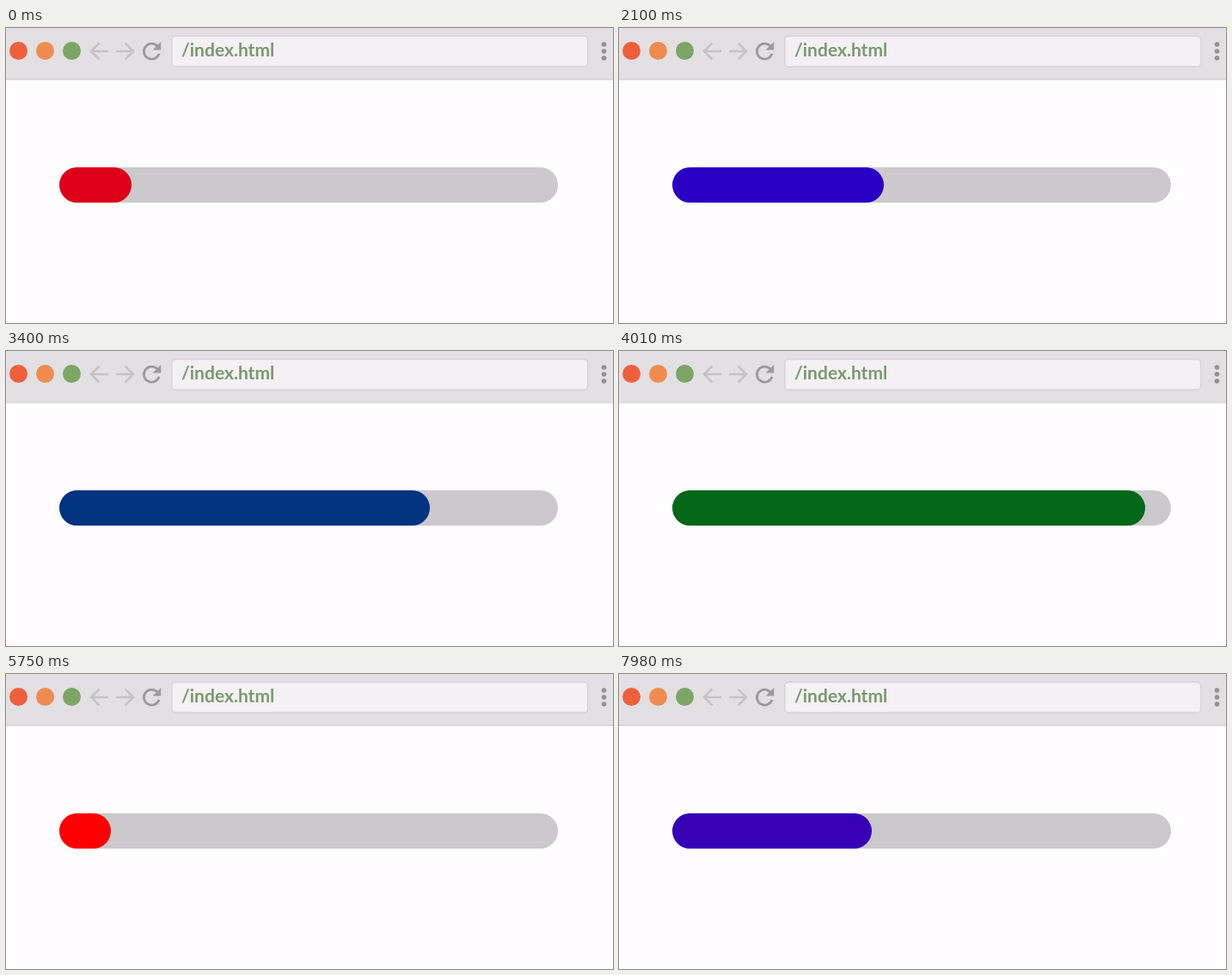
Recreate the animation shown at these times as an HTML page. Size 706 px wide and 343 px high, loop 8 s.

```html
<!DOCTYPE html>
<html lang="en">
<head>
<meta charset="utf-8">
<title>Progress bar</title>
<style>
  html, body { margin: 0; width: 100%; height: 100%; overflow: hidden; background: #fffdff; }
  svg { position: absolute; left: 0; top: 0; }
  .track, .fill { position: absolute; height: 41px; border-radius: 20.5px; }
  .track { left: 61.5px; top: 162px; width: 580px; background: #cbc9cb; }
  .fill { left: 0; top: 0; animation: load 8s linear infinite; }
  text { font: 700 21px Lato, "Open Sans", sans-serif; fill: #7b9871; }

  /* grow slowly to blue, quickly to green, then fall back to red */
  @keyframes load {
    0%       { width: 84.5px;  background: rgb(222, 0, 24); }
    14.25%   { width: 174.5px; background: rgb(115, 0, 116); }
    33.45%   { width: 290px;   background: rgb(0, 0, 246); }
    35.625%  { width: 324px;   background: rgb(0, 4, 221); }
    50.125%  { width: 550px;   background: rgb(3, 104, 23); }
    52.04%   { width: 580px;   background: rgb(3, 118, 0); }
    71.55%   { width: 58px;    background: rgb(255, 0, 0); }
    83%      { width: 129.5px; background: rgb(165, 0, 69); }
    100%     { width: 234px;   background: rgb(54, 0, 183); }
  }
</style>
</head>
<body>
<svg width="706" height="343" viewBox="0 0 706 343">
  <rect width="706" height="60" fill="#e2e0e2"/>
  <rect y="59" width="706" height="1.5" fill="#d4d2d4"/>
  <circle cx="14.5" cy="26.5" r="10.5" fill="#ee603c"/>
  <circle cx="45.5" cy="26.5" r="10.5" fill="#f08c50"/>
  <circle cx="76.5" cy="26.5" r="10.5" fill="#7ca566"/>
  <g fill="none" stroke="#c5c3c5" stroke-width="2.6">
    <path d="M119 27H99.5M108.5 17.5L99 27L108.5 36.5"/>
    <path d="M128 27H147.5M138.5 17.5L148 27L138.5 36.5"/>
  </g>
  <path d="M176.2 21.2A9 9 0 1 0 178 29.8" fill="none" stroke="#9c9a9c" stroke-width="2.8"/>
  <path d="M180.2 16V25.6H170.6Z" fill="#9c9a9c"/>
  <rect x="193" y="9.5" width="483.5" height="35.5" rx="4" fill="#f3f1f3" stroke="#d6d4d6" stroke-width="1.3"/>
  <text x="204" y="33.3">/index.html</text>
  <g fill="#949094">
    <circle cx="695.5" cy="19" r="2.8"/>
    <circle cx="695.5" cy="27" r="2.8"/>
    <circle cx="695.5" cy="35" r="2.8"/>
  </g>
</svg>
<div class="track"><div class="fill"></div></div>
</body>
</html>
```
